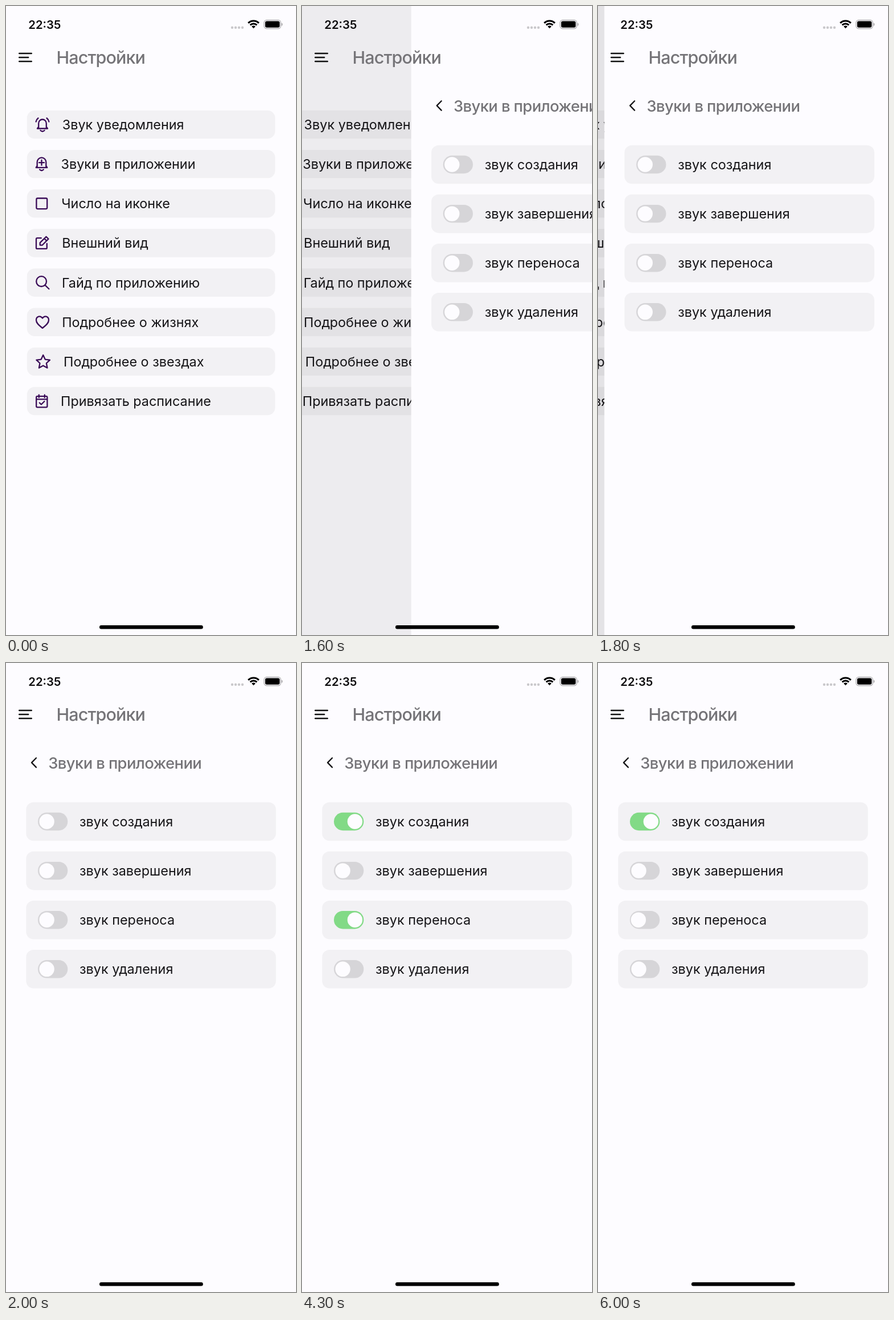
An HTML page with a canvas for the animation above (6100 ms loop, 509x1101 px).

```html
<!DOCTYPE html>
<html lang="ru">
<head>
<meta charset="utf-8">
<title>Настройки</title>
<style>
  html, body { margin: 0; width: 100%; height: 100%; overflow: hidden; background: #fdfcff; }
  canvas { display: block; width: 509px; height: 1101px; }
</style>
</head>
<body>
<canvas id="stage"></canvas>
<script>
const W = 509, H = 1101, LOOP = 6100, STEP = 100;
const BG = '#fdfcff', CARD = '#f2f1f4', INK = '#151417', GRAY = '#757478', PURPLE = '#3a0b57';
const OFF = [214, 213, 216], ON = [130, 218, 134];

const canvas = document.getElementById('stage');
const ctx = canvas.getContext('2d');
const dpr = window.devicePixelRatio || 1;
canvas.width = W * dpr;
canvas.height = H * dpr;

function box(x, y, w, h, r, fill) {
  ctx.beginPath();
  ctx.roundRect(x, y, w, h, r);
  ctx.fillStyle = fill;
  ctx.fill();
}

function disc(x, y, r, fill) {
  ctx.beginPath();
  ctx.arc(x, y, r, 0, Math.PI * 2);
  ctx.fillStyle = fill;
  ctx.fill();
}

function stroke(d, color, width) {
  ctx.strokeStyle = color;
  ctx.lineWidth = width;
  ctx.lineCap = ctx.lineJoin = 'round';
  ctx.stroke(new Path2D(d));
}

// x is the left edge of the visible glyphs
function label(str, x, y, size, color, weight = 400, spacing = 0) {
  ctx.font = `${weight} ${size}px Inter, "Open Sans", sans-serif`;
  ctx.letterSpacing = spacing + 'px';
  ctx.fillStyle = color;
  ctx.fillText(str, x + ctx.measureText(str).actualBoundingBoxLeft, y);
}

function starPath() {
  let d = '';
  for (let i = 0; i < 10; i++) {
    const a = -Math.PI / 2 + i * Math.PI / 5, r = i % 2 ? 6 : 12.4;
    d += `${i ? 'L' : 'M'}${r * Math.cos(a)} ${1 + r * Math.sin(a)}`;
  }
  return d + 'Z';
}

// Icons are drawn around the row's vertical centre
const icons = {
  ringing: 'M-9 7H9M-6.8 7V-2A6.8 7 0 0 1 6.8 -2V7M-6.8 4L-9 7M6.8 4L9 7M-3.6 10.2Q0 13.8 3.6 10.2M-11.4 -5Q-10.5 -9 -7.5 -11.2M11.4 -5Q10.5 -9 7.5 -11.2',
  bellPlus: 'M-9.8 6.2H9.8M-7.8 6.2V-3.2A7.8 8 0 0 1 7.8 -3.2V6.2M-7.8 3L-9.8 6.2M7.8 3L9.8 6.2M-3.4 9.6Q0 13 3.4 9.6M0 -7V2M-4.5 -2.5H4.5',
  square: 'M-7.4 -9.3H7.4Q9.4 -9.3 9.4 -7.3V7.3Q9.4 9.3 7.4 9.3H-7.4Q-9.4 9.3 -9.4 7.3V-7.3Q-9.4 -9.3 -7.4 -9.3Z',
  edit: 'M-1.5 -8.8H-8.5Q-10.3 -8.8 -10.3 -7V8.2Q-10.3 10 -8.5 10H6.7Q8.5 10 8.5 8.2V1M-3.6 3.6V-0.6L7.2 -11.2L11.2 -7.2L0.5 3.6ZM4 -8L8 -4',
  search: 'M7 -2A8.9 8.9 0 1 1 -10.8 -2A8.9 8.9 0 1 1 7 -2M4.6 4.5L11.4 11.2',
  heart: 'M0 10.5C-5 6.5 -11 2.5 -11 -3.5C-11 -10.5 -3.5 -12 0 -6.8C3.5 -12 11 -10.5 11 -3.5C11 2.5 5 6.5 0 10.5Z',
  star: starPath(),
  calendar: 'M-7.8 -8.4H7.8Q9.6 -8.4 9.6 -6.6V9Q9.6 10.8 7.8 10.8H-7.8Q-9.6 10.8 -9.6 9V-6.6Q-9.6 -8.4 -7.8 -8.4ZM-9.6 -3.2H9.6M-5 -11V-6.4M5 -11V-6.4M-4 3L-1 6L4.6 0.4'
};

const menu = [
  ['ringing', 64, 'Звук уведомления', 99.8],
  ['bellPlus', 62.5, 'Звуки в приложении', 97.5],
  ['square', 62.8, 'Число на иконке', 98.2],
  ['edit', 63.3, 'Внешний вид', 100.3],
  ['search', 64, 'Гайд по приложению', 100],
  ['heart', 64, 'Подробнее о жизнях', 100.2],
  ['star', 65.2, 'Подробнее о звездах', 103],
  ['calendar', 62.8, 'Привязать расписание', 98]
];
const sounds = ['звук создания', 'звук завершения', 'звук переноса', 'звук удаления'];

function drawMenu() {
  menu.forEach(([icon, ix, str, tx], i) => {
    const mid = 207.5 + i * 69.15;
    box(36.8, mid - 24.7, 435.6, 49.4, 13.5, CARD);
    ctx.save();
    ctx.translate(ix, mid);
    stroke(icons[icon], PURPLE, 2.3);
    ctx.restore();
    label(str, tx, mid + 8.5, 23.4, INK);
  });
}

function drawToggle(mid, p) {
  const mix = Math.min(1, Math.max(0, p));
  const color = OFF.map((c, i) => Math.round(c + (ON[i] - c) * mix));
  box(56, mid - 15.7, 52.3, 31.4, 15.7, `rgb(${color})`);
  disc(71.6 + 21.3 * p, mid, 13.2, BG);
}

function drawSounds(t) {
  stroke('M53 166.2L45 174.4L53 182.6', INK, 2.3);
  label('Звуки в приложении', 75.3, 184.6, 27.4, GRAY, 500, -0.6);
  sounds.forEach((str, i) => {
    const mid = 277.5 + i * 86.1;
    box(35.3, mid - 33.8, 438.5, 67.6, 13, CARD);
    drawToggle(mid, toggleAt(i, t));
    label(str, 130, mid + 8.5, 23.4, INK);
  });
}

function drawHeader() {
  stroke('M23.2 83H44.8M23.2 90H39.2M23.2 97H44.8', '#111', 2.4);
  label('Настройки', 90.5, 101.2, 30.5, GRAY, 500, -0.9);
}

function wifiArc(r, width) {
  ctx.beginPath();
  ctx.arc(434.5, 39.2, r, -Math.PI * 0.75, -Math.PI * 0.25);
  ctx.lineWidth = width;
  ctx.lineCap = 'butt';
  ctx.strokeStyle = '#000';
  ctx.stroke();
}

function drawSystem() {
  label('22:35', 40.3, 39.8, 20.3, '#0b0a0c', 600);
  for (let i = 0; i < 4; i++) disc(397 + i * 6, 37.7, 2.2, '#c9c8cb');
  wifiArc(13.2, 3.1);
  wifiArc(8.3, 3);
  wifiArc(2.4, 4.8);
  ctx.beginPath();
  ctx.roundRect(453, 24.7, 29.3, 15, 4.6);
  ctx.lineWidth = 1.2;
  ctx.strokeStyle = '#a5a4a7';
  ctx.stroke();
  box(454.9, 26.6, 25.5, 11.2, 2.8, '#000');
  box(483.7, 29.7, 1.7, 5, [0, 2, 2, 0], '#a5a4a7');
  box(164, 1084, 181.8, 6.4, 3.2, '#000');
}

// Critically damped push; t in ms
function push(t) {
  if (t < 1500) return 0;
  if (t >= 2000) return 1;
  const x = (t - 1483) * 0.01805;
  return 1 - (1 + x) * Math.exp(-x);
}

// Slightly underdamped spring
function spring(ms) {
  const x = ms * 0.009;
  return 1 - Math.exp(-x) * (Math.cos(x) + Math.sin(x));
}

function turnOn(t, start) {
  if (t < start) return 0;
  return t >= start + 400 ? 1 : spring(t - start + 40);
}

function toggleAt(i, t) {
  if (i === 0) return turnOn(t, 2700);
  if (i !== 2) return 0;
  return t < 5600 ? turnOn(t, 3900) : 1 - spring(t - 5580);
}

function draw(t) {
  const p = push(t), x = W * (1 - p);
  ctx.setTransform(dpr, 0, 0, dpr, 0, 0);
  ctx.fillStyle = BG;
  ctx.fillRect(0, 0, W, H);
  if (p < 1) {
    ctx.save();
    ctx.translate(-0.3 * W * p, 0);
    drawMenu();
    ctx.restore();
    ctx.fillStyle = `rgba(0, 0, 0, ${0.1 * p})`;
    ctx.fillRect(0, 0, W, H);
  }
  if (p > 0) {
    ctx.save();
    ctx.translate(x, 0);
    ctx.fillStyle = BG;
    ctx.fillRect(0, 0, W, H);
    drawSounds(t);
    ctx.restore();
  }
  drawHeader();
  drawSystem();
}

const start = performance.now();
function tick() {
  const t = (performance.now() - start) % LOOP;
  draw(Math.floor(t / STEP) * STEP);
  requestAnimationFrame(tick);
}
tick();
</script>
</body>
</html>
```
